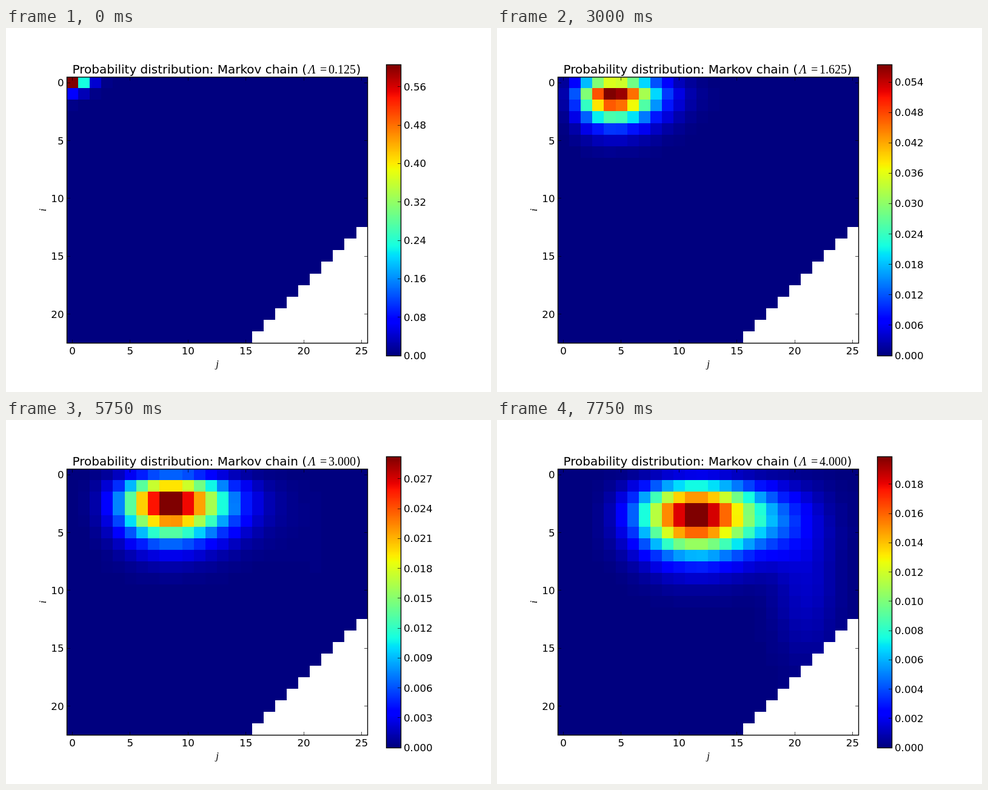
An HTML page with a canvas that plays this animation: 800 px wide and 600 px high, repeating every 8000 ms.

```html
<!DOCTYPE html>
<html lang="en">
<head>
<meta charset="utf-8">
<title>Probability distribution</title>
<style>
  html, body { margin: 0; width: 100%; height: 100%; overflow: hidden; background: #fff; }
  canvas, svg { position: absolute; left: 0; top: 0; width: 800px; height: 600px; }
  text { font: 16.67px "DejaVu Sans", sans-serif; fill: #000; white-space: pre; }
  .title { font-size: 20px; }
  .math { font-family: "Liberation Serif", serif; }
  .it { font-style: italic; }
  .line { stroke: #000; stroke-width: 1.39; fill: none; }
  .tick { stroke-width: .7; }
</style>
</head>
<body>
<canvas id="heat" width="800" height="600"></canvas>
<svg id="plot" viewBox="0 0 800 600">
  <text class="title" x="109.5" y="74.5">Probability distribution: Markov chain (</text>
  <text class="title math it" x="498.5" y="74.5">Λ</text>
  <text class="title math" x="518" y="74.5">=</text>
  <text class="title math" x="532" y="74.5" id="lambda"></text>
  <text class="title" x="577.5" y="74.5">)</text>
  <text class="math it" x="348.5" y="559" text-anchor="middle">j</text>
  <text class="math it" transform="translate(66 300) rotate(-90)" text-anchor="middle">i</text>
  <rect class="line" x="100.5" y="81" width="496" height="438.5"/>
  <rect class="line" x="627.5" y="60.5" width="24" height="480"/>
  <g id="axes"></g>
  <g id="scale"></g>
</svg>
<script>
const COLS = 26, ROWS = 23, MAX_SUM = 37;
const STEP_MS = 250, STEPS = 32;
const BAR = { x: 627, y: 60, w: 24, h: 480 };
const NICE = [1, 1.5, 2, 2.5, 3, 4, 5, 6, 8, 10];

const $ = id => document.getElementById(id);
const ctx = $('heat').getContext('2d');

function add(parent, tag, attrs, text = '') {
  const el = document.createElementNS('http://www.w3.org/2000/svg', tag);
  for (const key in attrs) el.setAttribute(key, attrs[key]);
  el.textContent = text;
  parent.append(el);
}

function tick(parent, x, y, dx, dy) {
  add(parent, 'path', { class: 'line tick', d: `M${x} ${y}l${dx} ${dy}` });
}

// Jet colour map: piecewise linear channels, 256 levels
const CHANNELS = [
  [[0, 0], [.35, 0], [.66, 1], [.89, 1], [1, .5]],
  [[0, 0], [.125, 0], [.375, 1], [.64, 1], [.91, 0], [1, 0]],
  [[0, .5], [.11, 1], [.34, 1], [.65, 0], [1, 0]]
];

function ramp(points, v) {
  const k = Math.max(1, points.findIndex(p => p[0] >= v));
  const [x0, y0] = points[k - 1], [x1, y1] = points[k];
  return y0 + (y1 - y0) * (v - x0) / (x1 - x0);
}

const JET = Array.from({ length: 256 }, (_, n) =>
  `rgb(${CHANNELS.map(c => Math.floor(255 * ramp(c, n / 255))).join()})`);

const jet = v => JET[Math.min(255, Math.floor(v * 256))];

function poisson(mean, n) {
  let p = Math.exp(-mean);
  for (let k = 1; k <= n; k++) p *= mean / k;
  return p;
}

function bell(j, i, cj, ci, sj, si) {
  const u = (j - cj) / sj, v = (i - ci) / si;
  return Math.exp(-(u * u + v * v) / 2) / (2 * Math.PI * sj * si);
}

// Independent Poisson counts, with mass leaking to a second mode at high load
function distribution(load) {
  const leak = .11 * Math.exp(2.5 * (load - 4));
  const pj = Array.from({ length: COLS }, (_, j) => poisson(3 * load, j));
  const pi = Array.from({ length: ROWS }, (_, i) => poisson(load, i));
  return pi.map((a, i) => pj.map((b, j) => (1 - leak) * a * b + leak *
    (.42 * bell(j, i, 18.7, 4.3, 2.2, 2) + .58 * bell(j, i, 21, 9.5, 1.9, 4.2))));
}

const edgeX = j => Math.min(596, Math.round(100 + 19.1 * j));
const edgeY = i => Math.min(519, Math.round(80.2 + 19.08 * i));

function drawHeat(p, max) {
  ctx.clearRect(100, 80, 497, 440);
  for (let i = 0; i < ROWS; i++) {
    for (let j = 0; j < COLS && i + j <= MAX_SUM; j++) {
      const x = edgeX(j), y = Math.max(81, edgeY(i));
      ctx.fillStyle = jet(p[i][j] / max);
      ctx.fillRect(x, y, edgeX(j + 1) - x, edgeY(i + 1) - y);
    }
  }
}

function drawScale(max) {
  const g = $('scale');
  g.replaceChildren();
  const raw = max / 10;
  const unit = 10 ** Math.floor(Math.log10(raw));
  const step = unit * NICE.find(n => n * unit >= raw);
  let digits = 0;
  while (Math.abs(step * 10 ** digits - Math.round(step * 10 ** digits)) > 1e-6) digits++;
  for (let k = 0; k * step <= max; k++) {
    const y = BAR.y + BAR.h * (1 - k * step / max);
    tick(g, 651.5, Math.floor(y) + .5, -5.5, 0);
    add(g, 'text', { x: 656, y: Math.round(y) + 6 }, (k * step).toFixed(digits));
  }
}

function drawStatic() {
  const axes = $('axes');
  for (let n = 0; n < COLS; n += 5) {
    const x = 109.5 + 19.077 * n, sx = Math.floor(x) + .5;
    tick(axes, sx, 519.5, 0, -5.5);
    tick(axes, sx, 81, 0, 5.5);
    add(axes, 'text', { x, y: 538, 'text-anchor': 'middle' }, n);
    if (n >= ROWS) continue;
    const y = 90.2 + 19.077 * n, sy = Math.floor(y) + .5;
    tick(axes, 100.5, sy, 5.5, 0);
    tick(axes, 596.5, sy, -5.5, 0);
    add(axes, 'text', { x: 95.5, y: Math.round(y) + 6, 'text-anchor': 'end' }, n);
  }
  for (let y = 0; y < BAR.h; y++) {
    ctx.fillStyle = jet(1 - (y + .5) / BAR.h);
    ctx.fillRect(BAR.x, BAR.y + y, BAR.w, 1);
  }
}

let shown = -1;

function frame() {
  const step = Math.floor(performance.now() / STEP_MS) % STEPS;
  if (step !== shown) {
    shown = step;
    const load = (step + 1) / 8;
    const p = distribution(load);
    const max = Math.max(...p.flat());
    $('lambda').textContent = load.toFixed(3);
    drawHeat(p, max);
    drawScale(max);
  }
  requestAnimationFrame(frame);
}

drawStatic();
frame();
</script>
</body>
</html>
```
